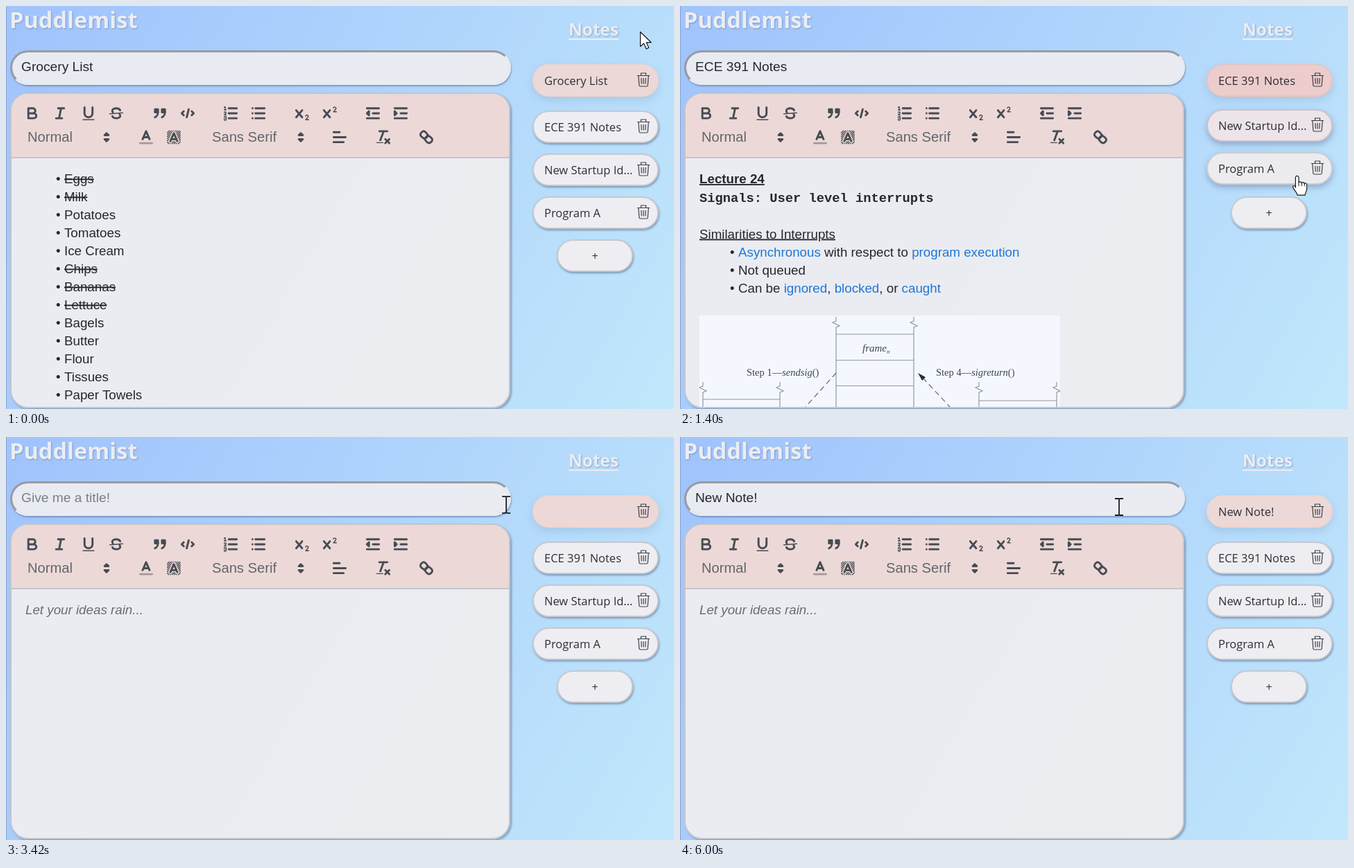
An HTML page that plays this animation: 963 px wide and 582 px high, repeating every 6080 ms.

```html
<!DOCTYPE html>
<html lang="en">
<head>
<meta charset="utf-8">
<title>Notes</title>
<style>
html, body { margin: 0; width: 100%; height: 100%; overflow: hidden; }
#stage { position: absolute; left: 0; top: 0; width: 963px; height: 582px; overflow: hidden;
  background: linear-gradient(120deg, #a1c4fd 4%, #c2e9fb 104%); }
#stage > *, .pill svg { position: absolute; box-sizing: border-box; }
#edge { left: 0; top: 0; width: 1px; height: 582px; background: #8aa3cf; }
#field { left: 6px; top: 64px; width: 722px; height: 50px; border-radius: 25px;
  border: 3px solid; border-color: #9a9ca2 #e9ebef #e9ebef #9a9ca2;
  background: rgba(238, 238, 241, .93); background-clip: padding-box;
  box-shadow: 1px 2px 2px rgba(80, 100, 135, .5); }
#editor { left: 6px; top: 125px; width: 721px; height: 456px; border-radius: 26px; overflow: hidden;
  border: 2px solid #c3c6cc; background: rgba(238, 238, 241, .94);
  box-shadow: 2px 2px 3px rgba(80, 100, 135, .55); }
#bar { height: 91px; background: #ecd9d7; border-bottom: 2px solid #c3c6cc; }
.pill { box-sizing: border-box; left: 759px; width: 182px; height: 47px; border: 2px solid; border-radius: 24px; }
.pill svg { left: -2px; top: -2px; overflow: visible; }
svg { left: 0; top: 0; }
text { white-space: pre; }
.sans { font-family: "Liberation Sans", Arial, sans-serif; }
.ui { font-family: "Open Sans", "Noto Sans", sans-serif; }
.mono { font-family: "Liberation Mono", monospace; font-weight: bold; }
.serif { font-family: "Liberation Serif", serif; }
.head { font-weight: 700; fill: #ebedf2; text-shadow: 1px 1px 2px rgba(80, 100, 140, .45); }
</style>
</head>
<body>
<div id="stage">
  <div id="edge"></div>
  <div id="field"></div>
  <div id="editor"><div id="bar"></div></div>
  <svg id="page" width="963" height="582"></svg>
  <div id="pills"></div>
  <svg id="top" width="963" height="582">
    <circle id="click" r="17" fill="#ffac24" fill-opacity=".86"/>
    <g id="mouse" stroke-linejoin="round"></g>
  </svg>
</div>
<script>
const LOOP = 6080, INK = '#25272d', ICON = '#474b54';
const $ = id => document.getElementById(id);
const clamp = v => Math.max(0, Math.min(1, v));
const text = (x, y, size, str, cls = 'sans', extra = '') =>
  `<text x="${x}" y="${y}" font-size="${size}" class="${cls}" ${extra}>${str}</text>`;
const path = (d, extra = '') => `<path d="${d}" ${extra}/>`;

// ---- toolbar icons on an 18 unit grid
const THIN = 'stroke-width="1"', FULL = `fill="${ICON}"`;
const A = 'M5.5 11L9 3l3.5 8M11.63 9H6.38';
const X = 'M3 6l6 7M9 6l-6 7';
const TWO = 'M12.5 11.8a1.3 1.3 0 1 1 2.4.9L12.6 15.5h2.9';
// diagonal strokes filling the square from 2.5 to 15.5
const hatch = Array.from({ length: 12 }, (_, i) => {
  const k = 7 + 2 * i, lo = Math.max(2.5, k - 15.5);
  return `M${lo} ${k - lo}L${k - lo} ${lo}`;
}).join('');
const icons = {
  bold: path('M5 4h4.5a2.5 2.5 0 0 1 0 5H5zM5 9h5.5a2.5 2.5 0 0 1 0 5H5z'),
  italic: path('M7 4h6M5 14h6M8 14L10 4'),
  underline: path('M5 3v6a4 4 0 0 0 8 0V3') + path('M3.5 15.5h11', THIN),
  strike: path('M12.9 6C12.4 4.8 11 4 9 4 6.7 4 5 5.1 5 6.5c0 .7.2 1.1.6 1.5M5.1 12c.5 1.2 1.9 2 3.9 2 2.3 0 4-1.1 4-2.5 0-.7-.2-1.1-.6-1.5')
    + path('M15.5 8.5l-13 1', THIN),
  quote: path('M4 5h3v3H4zM11 5h3v3h-3z', FULL) + path('M7 8c0 4-3 5-3 5M14 8c0 4-3 5-3 5'),
  code: path('M5 7L3 9l2 2M13 7l2 2-2 2M10 5L8 13'),
  ordered: path('M7 4h8M7 9h8M7 14h8')
    + path('M2.4 3l1.1-.6v3.1M2.5 5.5h2M4.5 10.5h-2c0-.3 1.9-1.1 1.9-2.2a1 1 0 0 0-1.9-.1M2.5 14.8a1 1 0 1 0 1.2-.8 1 1 0 1 0-1.2-.8', THIN),
  bullet: path('M6 4h9M6 9h9M6 14h9M3 4h.01M3 9h.01M3 14h.01'),
  sub: path(X) + path(TWO, THIN),
  sup: path(X) + path(TWO, THIN + ' transform="translate(0 -8)"'),
  outdent: path('M3 14h12M3 4h12M9 9h6M5 7v4L3 9z'),
  indent: path('M3 14h12M3 4h12M9 9h6M3 7v4l2-2z', FULL),
  picker: path('M7 11l2 2 2-2zM7 7l2-2 2 2z'),
  color: path(A) + path('M3 15h12', 'opacity=".45"'),
  back: path(hatch, 'stroke-width=".9"')
    + path(A, 'transform="translate(0 2)" stroke="#ecd9d7" stroke-width="4"')
    + path(A, 'transform="translate(0 2)"'),
  align: path('M3 9h12M3 14h10M3 4h6'),
  clean: path('M5 3h8M6 12l3.35-9M11 11l4 4M15 11l-4 4') + path('M2.5 14.5h6', THIN),
  link: path('M7 11l4-4M8.9 4.6a3.5 3.5 0 0 1 .4 4.7 3.5 3.5 0 0 1-4.7-.4C3.2 7.5 2 6.4 4.2 4.2s3.3-1 4.7.4zM13.4 9.1a3.5 3.5 0 0 0-4.7-.4 3.5 3.5 0 0 0 .4 4.7c1.4 1.4 2.5 2.5 4.7.4s1-3.3-.4-4.7z')
};
const icon = (name, x, y) => `<g transform="translate(${x - 13} ${y - 13}) scale(1.44)">${icons[name]}</g>`;
const row = (y, list) => Object.entries(list).map(([n, x]) => icon(n, x, y)).join('');
const toolbar = `<g fill="none" stroke="${ICON}" stroke-width="2" stroke-linecap="round" stroke-linejoin="round">`
  + row(155, { bold: 38, italic: 78, underline: 119, strike: 159, quote: 222, code: 262, ordered: 324,
    bullet: 364, sub: 427, sup: 467, outdent: 529, indent: 569 })
  + row(189.5, { picker: 145, color: 202, back: 242, align: 481, clean: 544, link: 606 })
  + icon('picker', 425, 189.5) + '</g>'
  + text(31, 196, 20.16, 'Normal', 'sans', 'fill="#62666d"')
  + text(297, 196, 20.16, 'Sans Serif', 'sans', 'fill="#62666d"');

// ---- editor contents
const BODY = 18.76;
const line = (y, str, cls, extra) => text(28, y, BODY, str, cls, extra);
const item = (y, str, extra) => text(72, y, BODY, '•') + text(84, y, BODY, str, 'sans', extra);
const blue = s => `<tspan fill="#1f76d6">${s}</tspan>`;

const groceries = ['-Eggs', '-Milk', 'Potatoes', 'Tomatoes', 'Ice Cream', '-Chips', '-Bananas', '-Lettuce',
  'Bagels', 'Butter', 'Flour', 'Tissues', 'Paper Towels']
  .map((s, i) => item(256 + 26 * i, s.replace('-', ''), s[0] === '-' ? 'text-decoration="line-through"' : '')).join('');

const crack = (x, y) => `M${x} ${y - 9}v6l-5 2 10 5-5 2V600`;
const label = (x, str, call) => text(x, 534, 14.5, `${str}—<tspan font-style="italic">${call}</tspan>()`, 'serif');
const diagram = `<svg x="28" y="447" width="520" height="132" viewBox="28 447 520 132">
  <rect x="28" y="447" width="520" height="133" fill="#f4f8fe"/>
  <g fill="none" stroke="#9298a1" stroke-width="1.2">`
  + path([[225, 458], [337, 458], [33, 552], [144, 552], [431, 552], [543, 552]].map(p => crack(...p)).join(''))
  + path('M225 474h112M225 511.5h112M225 548.5h112M33 568h111M431 570h112')
  + path('M225 530L180 580M350 537l40 43', 'stroke-dasharray="8 5" stroke="#62666e"') + '</g>'
  + path('M343 530l11 6-5 5z', 'fill="#2b2e36"')
  + `<g fill="#41454e">` + label(96, 'Step 1', 'sendsig') + label(369, 'Step 4', 'sigreturn')
  + text(263, 499, 15, 'frame<tspan dy="3" font-size="9">n</tspan>', 'serif', 'font-style="italic"') + '</g></svg>';

const lecture = line(256, 'Lecture 24', 'sans', 'font-weight="bold" text-decoration="underline"')
  + line(283, 'Signals: User level interrupts', 'mono')
  + line(335.5, 'Similarities to Interrupts', 'sans', 'text-decoration="underline"')
  + item(362, `${blue('Asynchronous')} with respect to ${blue('program execution')}`)
  + item(388, 'Not queued')
  + item(414, `Can be ${blue('ignored')}, ${blue('blocked')}, or ${blue('caught')}`)
  + diagram;
const empty = line(256, 'Let your ideas rain...', 'sans', 'font-style="italic" fill="#696c72"');

$('page').innerHTML = text(5, 32, 32.6, 'Puddlemist', 'ui head')
  + text(811, 43, 24.4, 'Notes', 'ui head')
  + '<rect class="head" x="811" y="47" width="72" height="2"/>'
  + toolbar + `<g fill="${INK}">` + [groceries, lecture, empty].map(s => `<g class="body">${s}</g>`).join('')
  + text(22, 94, 19.2, '', 'sans', 'id="title"') + '<rect id="caret" y="78" width="1.3" height="20"/></g>';
const bodies = document.querySelectorAll('.body');

// ---- pills: fill rgb, border rgb, shadow x y blur rgba, lift
const looks = {
  plain: [238, 238, 242, 200, 201, 207, 1, 2, 3, 80, 100, 135, .58, 0],
  hover: [234, 234, 237, 207, 207, 211, 0, 6, 13, 80, 100, 140, .27, 3],
  picked: [236, 217, 215, 240, 212, 205, 0, 5, 12, 110, 130, 165, .22, 3],
  red: [245, 95, 103, 215, 32, 42, 1, 6, 12, 235, 80, 110, .4, 3],
  green: [184, 246, 210, 110, 222, 155, 0, 6, 13, 70, 120, 150, .27, 3]
};
const EVER = -1e4, NEVER = 1e6;
// each note: label, base look, then passing looks as [look, on, off]
const scenes = [
  { from: 0, title: 'Grocery List', plus: [], notes: [
    ['Grocery List', 'picked', ['red', 530, NEVER]], ['ECE 391 Notes', 'plain'],
    ['New Startup Id...', 'plain'], ['Program A', 'plain']] },
  { from: 940, title: 'ECE 391 Notes', plus: [['green', 1530, NEVER]], notes: [
    ['ECE 391 Notes', 'picked', ['red', EVER, 1175]],
    ['New Startup Id...', 'plain', ['hover', 1170, 1350], ['red', 1185, 1300]],
    ['Program A', 'plain', ['hover', 1270, 1510]]] },
  { from: 2100, plus: [['green', EVER, 2090]], notes: [
    ['', 'picked'], ['ECE 391 Notes', 'plain', ['hover', EVER, 2090], ['picked', EVER, 1925], ['hover', 2760, 2900]],
    ['New Startup Id...', 'plain', ['hover', 2680, 2770]], ['Program A', 'plain', ['hover', 1950, 2740]]] }
];
const slotY = i => i ? 89 + 62 * i : 87;
const level = (t, on, off) => t < on ? 0 : clamp(clamp((Math.min(t, off) - on) / 250) - Math.max(0, t - off) / 250);
const mix = (a, b, k) => a.map((v, i) => v + (b[i] - v) * k);

const trash = path('M156.5 16.5V13h7v3.5M151 16.5h18M152.8 16.5l1 14q.1 1.5 1.6 1.5h9.2q1.5 0 1.6-1.5l1-14M156.8 20l.4 8.5M160 20v8.5M163.2 20l-.4 8.5',
  'fill="none" stroke="#3a3e46" stroke-width="1.2"');
const pills = [0, 1, 2, 3, 4].map(i => {
  const el = document.createElement('div');
  el.className = 'pill';
  el.style.position = 'absolute';
  el.innerHTML = `<svg width="182" height="47" fill="#2c2f35">` + (i < 4 ? text(17, 29.5, 16.5, '', 'ui') + trash
    : text(55, 30, 16, '+', 'ui', 'text-anchor="middle"')) + '</svg>';
  if (i === 4) Object.assign(el.style, { left: '794px', width: '110px' });
  $('pills').append(el);
  return el;
});
function dress(el, slot, base, passing, t) {
  const s = passing.reduce((look, [kind, on, off]) => mix(look, looks[kind], level(t, on, off)), looks[base]);
  const n = i => s[i].toFixed(2);
  el.style.top = (slotY(slot) - s[13]).toFixed(2) + 'px';
  el.style.background = `rgb(${n(0)},${n(1)},${n(2)})`;
  el.style.borderColor = `rgb(${n(3)},${n(4)},${n(5)})`;
  el.style.boxShadow = `${n(6)}px ${n(7)}px ${n(8)}px rgba(${n(9)},${n(10)},${n(11)},${n(12)})`;
}

// ---- typing: [time, letters in the field], [time, letters in the list]
const NOTE = 'New Note!';
const typed = [[4120, 1], [4270, 2], [4380, 3], [4460, 4], [4730, 5], [4850, 6], [4970, 7], [5080, 8], [5450, 9]];
const synced = [[4580, 3], [5220, 8], [5520, 9]];
const last = (list, t) => list.filter(e => e[0] <= t).pop() || [3820, 0];

// ---- mouse
const route = [[90, 914, 37], [340, 882, 146], [630, 917, 108], [720, 918, 105], [1090, 918, 107], [1180, 912, 134],
  [1300, 902, 213], [1400, 891, 246], [1510, 877, 274], [1640, 868, 294], [1950, 867, 294], [2650, 867, 294],
  [2810, 862, 160], [2930, 853, 118], [3040, 849, 104], [3190, 849, 104], [3490, 683, 96], [3660, 683, 96], [3800, 633, 101]];
const clicks = [[750, 930], [2010, 2095], [3800, 3900]];
const EDGE = 'fill="#fff" stroke="#15171c" stroke-width="1.2"';
const shapes = {
  arrow: path('M.5.5v21l5-4.6 3.6 8 3.6-1.6-3.5-7.6h7z', EDGE),
  hand: path('M-3.5 16V1.5a2.3 2.3 0 0 1 4.6 0V9c0-2 4-2 4.3.5.5-1.5 3.8-1.2 4 .8.6-1.2 3.4-.8 3.4 1.5v6c0 3-2 4.5-2.5 9h-11c-.5-3.5-4-6-6-10-1.5-3 1-4.5 3.2-2z', EDGE)
    + path('M1.1 9v5M5.4 9.5V14M9.4 10.3V14', 'stroke="#15171c"'),
  beam: path('M-6-12h5l1 1 1-1h5M0-11v22M-6 12h5l1-1 1 1h5', 'fill="none" stroke="#1b1d22" stroke-width="1.8"')
};
function place(t) {
  const i = route.findIndex(p => p[0] > t);
  if (i === 0) return route[0].slice(1);
  if (i < 0) return route[route.length - 1].slice(1);
  const a = route[i - 1], b = route[i];
  return mix(a, b, (t - a[0]) / (b[0] - a[0])).slice(1);
}
function pointer(x, y, count) {
  if (x < 728) return y > 64 && y < 114 ? 'beam' : 'arrow';
  for (let i = 0; i <= count; i++) {
    const dy = y - slotY(i) + 3, wide = i < count;
    if (dy >= 0 && dy < 50 && x > (wide ? 759 : 794) && x < (wide ? 941 : 904)) return 'hand';
  }
  return 'arrow';
}

let shape = '';
function render(t) {
  const now = scenes.findLastIndex(s => s.from <= t), { notes, plus, title } = scenes[now];
  bodies.forEach((b, i) => b.style.display = i === now ? '' : 'none');

  const [key, count] = last(typed, t), name = title || NOTE.slice(0, count);
  const field = $('title');
  field.textContent = name || 'Give me a title!';
  field.setAttribute('fill', name ? INK : '#7b7e85');
  $('caret').style.display = t >= 3820 && t - key < 540 ? '' : 'none';
  $('caret').setAttribute('x', 22 + (name ? field.getComputedTextLength() : 0));

  pills.slice(0, 4).forEach((el, i) => {
    const note = notes[i];
    el.style.display = note ? '' : 'none';
    if (!note) return;
    const [label, base, ...passing] = note;
    el.querySelector('text').textContent = label || NOTE.slice(0, last(synced, t)[1]);
    dress(el, i, base, passing, t);
  });
  dress(pills[4], notes.length, 'plain', plus, t);

  const [x, y] = place(t), kind = pointer(x, y, notes.length);
  if (kind !== shape) $('mouse').innerHTML = shapes[shape = kind];
  $('mouse').setAttribute('transform', `translate(${x.toFixed(2)} ${y.toFixed(2)})`);
  const spot = $('click');
  spot.style.display = clicks.some(([a, b]) => t >= a && t < b) ? '' : 'none';
  spot.setAttribute('cx', x - 2);
  spot.setAttribute('cy', y);
}

const start = performance.now();
function tick() {
  render((performance.now() - start) % LOOP);
  requestAnimationFrame(tick);
}
tick();
</script>
</body>
</html>
```
